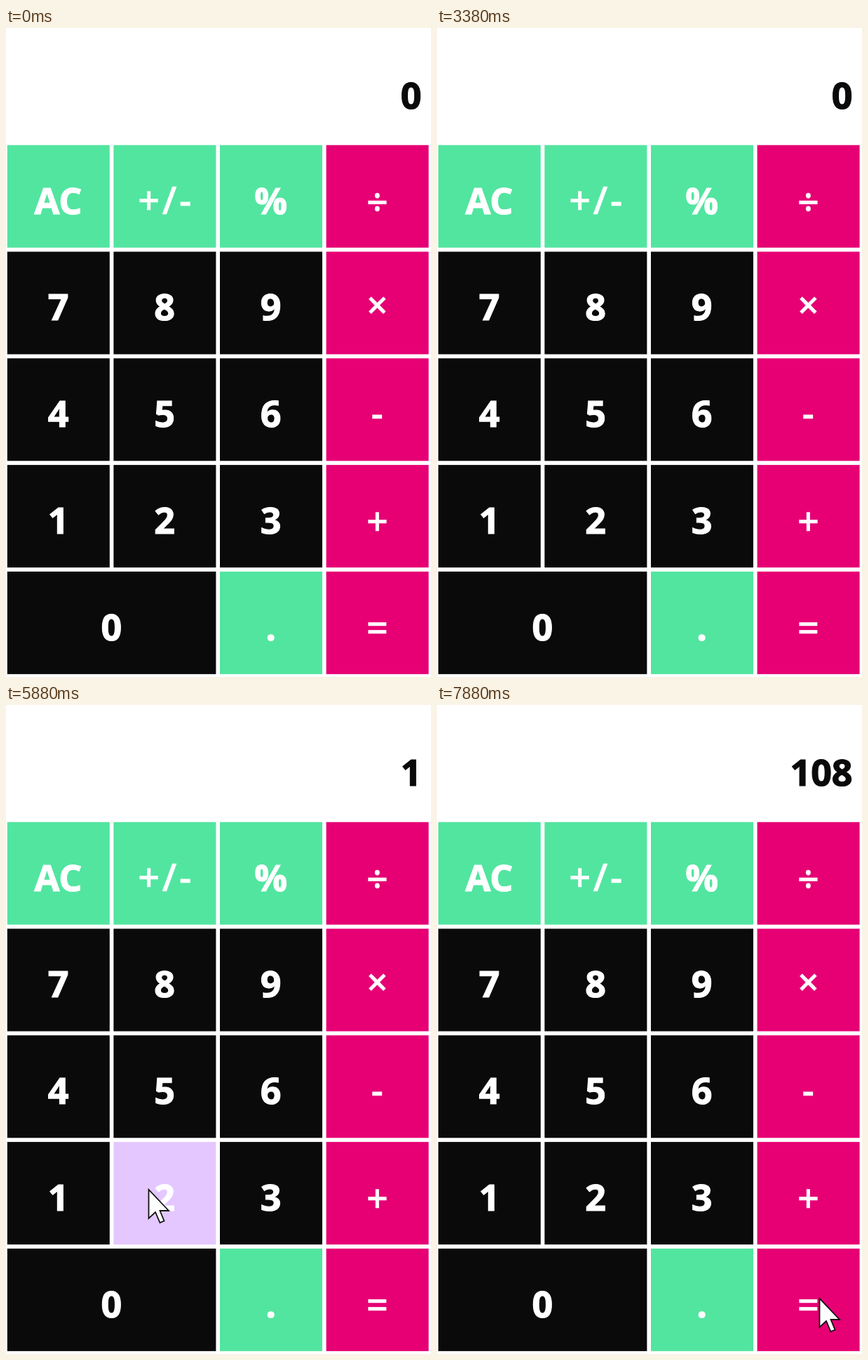
Recreate the animation shown at these times as an HTML page. Size 606 by 924 pixels, loop 8000 ms.

```html
<!DOCTYPE html>
<html lang="en">
<head>
<meta charset="utf-8">
<title>Calculator</title>
<style>
  html, body { margin: 0; width: 100%; height: 100%; overflow: hidden; background: #fff; }
  svg { display: block; width: 606px; height: 924px; }
  text {
    font: 700 52px "Open Sans", "Noto Sans", sans-serif;
    fill: #fff; stroke: #fff; stroke-width: 1.2; text-anchor: middle;
  }
  .sign { font-weight: 600; font-size: 54px; stroke-width: 0.4; }
  #display { fill: #0a0a0a; stroke: #0a0a0a; text-anchor: end; }
  .digit { fill: #0a0a0a; }
  .tool { fill: #52e5a0; }
  .op { fill: #e60074; }
  .pressed { fill: #e4c7ff; }
  #cursor { fill: #fff; stroke: #111; stroke-width: 1.8; }
</style>
</head>
<body>
<svg id="stage" viewBox="0 0 606 924">
  <text id="display" x="592.5" y="115">0</text>
  <g id="keys"></g>
  <path id="cursor" d="M1 2V43L10.5 34L17 49L23 46.5L17 32H29.5Z"/>
</svg>
<script>
const LOOP = 8000, PITCH_X = 151.6, PITCH_Y = 151.8, SIZE = 146;
const byId = id => document.getElementById(id);
const display = byId('display'), cursor = byId('cursor'), keys = {};

function add(tag, attrs) {
  const el = document.createElementNS('http://www.w3.org/2000/svg', tag);
  for (const name in attrs) el.setAttribute(name, attrs[name]);
  return byId('keys').appendChild(el);
}

function addKey(label, col, row, span = 1) {
  const kind = col === 3 ? 'op' : /\d/.test(label) ? 'digit' : 'tool';
  const x = 1.8 + col * PITCH_X, y = 166.7 + row * PITCH_Y;
  const width = SIZE + (span - 1) * PITCH_X;
  const drop = { '÷': 2, '×': -2, '+': 2, '=': 2 }[label] || 0;
  keys[label] = add('rect', { x, y, width, height: SIZE, class: kind });
  const text = add('text', { x: x + width / 2 - 0.3, y: y + 97.8 + drop });
  if (kind === 'op' || label === '+/-') text.classList.add('sign');
  if (label === '+/-') {
    text.setAttribute('letter-spacing', 3.5);
    text.setAttribute('dx', 2);
  }
  text.textContent = label;
}

[['AC', '+/-', '%', '÷'], ['7', '8', '9', '×'], ['4', '5', '6', '-'], ['1', '2', '3', '+']]
  .forEach((line, row) => line.forEach((label, col) => addKey(label, col, row)));
addKey('0', 0, 4, 2);
addKey('.', 2, 4);
addKey('=', 3, 4);

// Pointer path: time, x, y
const path = [
  [5250, 45, 790], [5375, 82.5, 712], [5625, 86, 710], [5875, 202.5, 688],
  [6000, 212, 681], [6500, 523, 358], [6625, 523.5, 356], [6875, 376, 384],
  [7125, 378, 384], [7500, 524, 873], [7625, 541, 852], [7750, 544, 846],
  [7875, 544.5, 843]
];
// Key presses: down, up, key, readout after release
const presses = [
  [5500, 5625, '1', '1'], [5875, 6000, '2', '12'], [6500, 6625, '×', ''],
  [7000, 7125, '9', '9'], [7625, 7750, '=', '108']
];

function pointerAt(t) {
  const next = path.findIndex(p => p[0] > t);
  if (next < 0) return path[path.length - 1].slice(1);
  const [t0, x0, y0] = path[next - 1], [t1, x1, y1] = path[next];
  const k = (t - t0) / (t1 - t0), e = k * k * (3 - 2 * k);
  return [x0 + (x1 - x0) * e, y0 + (y1 - y0) * e];
}

function draw(now) {
  // The screen refreshes eight times a second
  const t = Math.floor((now % LOOP) / 125) * 125;
  let readout = '0';
  for (const [down, up, key, result] of presses) {
    keys[key].classList.toggle('pressed', t >= down && t < up);
    if (t >= up) readout = result;
  }
  display.textContent = readout;
  const shown = t >= path[0][0];
  cursor.style.display = shown ? '' : 'none';
  if (shown) cursor.setAttribute('transform', `translate(${pointerAt(t)})`);
}

const start = performance.now();
function tick() {
  draw(performance.now() - start);
  requestAnimationFrame(tick);
}
tick();
</script>
</body>
</html>
```
